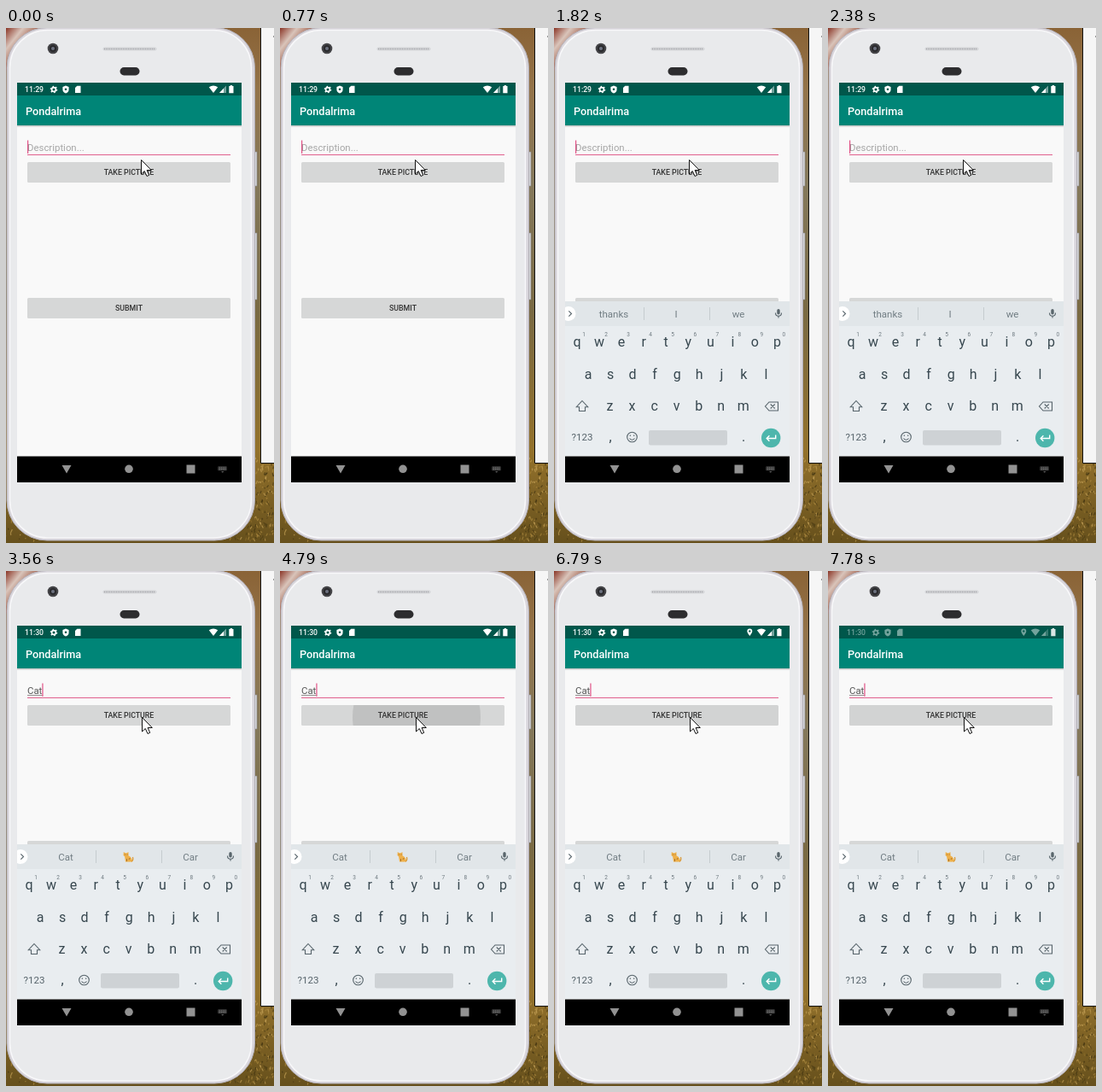
Recreate the animation shown at these times as an HTML page. Size 314x603 px, loop 8 s.

```html
<!DOCTYPE html>
<html lang="en">
<head>
<meta charset="utf-8">
<title>Phone form</title>
<style>
html, body { margin: 0; width: 100%; height: 100%; overflow: hidden; background: #7a6034; }
svg { display: block; width: 100vw; height: 100vh; font-family: Roboto, "Liberation Sans", sans-serif; }
.mid { text-anchor: middle; }
.medium { font-weight: 500; }
.line { fill: none; stroke: #56636a; stroke-width: 1.1; }
.key { font-size: 16px; fill: #37474f; }
.digit { font-size: 6.5px; fill: #6f7a80; }
.hint { font-size: 11.5px; fill: #717d83; }
.label { font-size: 8.8px; fill: #333; }
</style>
</head>
<body>
<svg viewBox="0 0 314 603" preserveAspectRatio="none">
  <defs>
    <linearGradient id="field" x2="0" y2="1">
      <stop offset="0" stop-color="#8a6336"/>
      <stop offset=".12" stop-color="#94744a"/>
      <stop offset=".3" stop-color="#85795c"/>
      <stop offset=".55" stop-color="#7a6a44"/>
      <stop offset=".82" stop-color="#94722c"/>
      <stop offset="1" stop-color="#66501c"/>
    </linearGradient>
    <linearGradient id="leaves" x2="1" y2="1">
      <stop offset="0" stop-color="#8a3526"/>
      <stop offset=".25" stop-color="#d9c4ba"/>
      <stop offset=".5" stop-color="#a2604c"/>
      <stop offset="1" stop-color="#7c4c38"/>
    </linearGradient>
    <linearGradient id="shade" x2="0" y2="1">
      <stop offset="0" stop-opacity=".25"/>
      <stop offset="1" stop-opacity="0"/>
    </linearGradient>
    <clipPath id="screen"><rect x="13" y="64" width="263" height="468"/></clipPath>
    <clipPath id="press"><rect x="25" y="157" width="238" height="24" rx="1.5"/></clipPath>
  </defs>

  <!-- backdrop and window behind the phone -->
  <rect width="314" height="603" fill="url(#field)"/>
  <rect width="40" height="50" fill="url(#leaves)"/>
  <g id="grass" stroke-width="1.2"/>
  <path d="M298.5 -1V509.5H315V-1z" fill="#f6f6f6" stroke="#111"/>
  <path d="M313 9h1v2h-1z" fill="#999"/>

  <!-- phone body -->
  <path d="M291 145h3v40h-3zM291 240h3v78h-3z" fill="#d4d5d8" stroke="#8c8c90" stroke-width=".6"/>
  <rect x="1" y="-.5" width="290.5" height="600.5" rx="47" fill="#d9d6dc" stroke="#b3b0b8"/>
  <rect x="4.5" y="2.5" width="283" height="594.5" rx="44" fill="#e9eaec" stroke="#f8f8fa" stroke-width="1.5"/>
  <circle cx="55" cy="24" r="6.3" fill="#444447"/>
  <circle cx="55" cy="24" r="4" fill="#29292c"/>
  <circle cx="55" cy="24" r="2" fill="#6d7280"/>
  <rect x="113.5" y="22.5" width="63" height="4" rx="2" fill="#d4d5d8"/>
  <path d="M115 24.5h60" stroke="#a2a3a7" stroke-width="1.5" stroke-dasharray="1 1"/>
  <rect x="133.5" y="46" width="23" height="9.5" rx="4.7" fill="#2d2d2f"/>

  <g clip-path="url(#screen)">
    <rect x="13" y="64" width="263" height="468" fill="#f9f9f9"/>
    <rect x="13" y="64" width="263" height="15" fill="#00574b"/>
    <rect x="13" y="79" width="263" height="35" fill="#008577"/>
    <rect x="13" y="114" width="263" height="2.5" fill="url(#shade)"/>
    <text x="23" y="102" class="medium" font-size="12.7" fill="#fff">Pondalrima</text>

    <g id="status" fill="#fff">
      <text id="clock" x="22" y="75" class="medium" font-size="8.7"></text>
      <circle cx="56" cy="72" r="2.4" fill="none" stroke="#fff" stroke-width="1.7"/>
      <circle cx="56" cy="72" r="3.7" fill="none" stroke="#fff" stroke-width="1.2" stroke-dasharray="1.6 2.27"/>
      <path d="M70 67.5l3.6 1.4v3q0 3-3.6 4.6q-3.6-1.6-3.6-4.6v-3z"/>
      <circle cx="70" cy="71.7" r="1.3" fill="#00574b"/>
      <path d="M83.3 67.7h4.2v8.3h-6.5v-6z"/>
      <path d="M237.8 69.3q5.2-3.6 10.4 0L243 76z"/>
      <path d="M250 76l8-8.5V76z" opacity=".45"/>
      <path d="M250 76l5-5.3V76z"/>
      <path id="place" fill-rule="evenodd" d="M229.3 76q-3-3.6-3-5.5a3 3 0 0 1 6 0q0 1.9-3 5.5zm0-6.7a1.2 1.2 0 1 0 .01 0z"/>
    </g>
    <path id="battery" d="M262.7 67h2.4v1h1.4v8.3h-5.2V68h1.4z" fill="#fff"/>

    <!-- form -->
    <text id="entry" x="25" y="143.5" font-size="11.4"></text>
    <path id="compose" stroke="#777" stroke-width=".8"/>
    <path d="M25 148.5h238" stroke="#e0608d"/>
    <rect id="caret" y="131.5" width="1.2" height="15.5" fill="#d81b60"/>
    <rect id="take" x="25" y="157" width="238" height="24" rx="1.5"/>
    <circle id="ripple" cx="160" cy="171" clip-path="url(#press)" opacity=".1"/>
    <text x="144" y="172.3" class="mid medium label">TAKE PICTURE</text>
    <rect x="25" y="316" width="238" height="24" rx="1.5" fill="#d6d7d7"/>
    <text x="144" y="331.2" class="mid medium label">SUBMIT</text>

    <!-- navigation bar -->
    <rect x="13" y="501.5" width="263" height="31"/>
    <g fill="#929292">
      <path d="M65.5 512h11l-5.5 9.5z"/>
      <circle cx="144" cy="516.3" r="4.8"/>
      <rect x="211.5" y="511.5" width="10" height="10"/>
      <path d="M248.5 513.5h10v4.5h-10zM252 519h3.5l-1.7 1.7z" opacity=".65"/>
      <path d="M249 514.8h9M249 516.8h9" stroke="#000" stroke-width=".7" stroke-dasharray="1 1"/>
    </g>

    <!-- keyboard -->
    <g id="board">
      <rect x="13" y="320" width="263" height="181" fill="#e9edf0"/>
      <rect x="13" y="320" width="263" height="29" fill="#e1e6e9"/>
      <circle cx="17" cy="334.5" r="8.5" fill="#fff"/>
      <path d="M17.3 331.3l3.2 3.2l-3.2 3.2" class="line"/>
      <path d="M105.5 327v15M182.5 327v15" stroke="#c5cccf"/>
      <g id="hints"></g>
      <g id="cat" fill="#eeb04a">
        <path d="M137.5 333l.3-4l2 1.3h1.6l2-1.3l.2 4q-3 3.500-6.100 0z"/>
        <path d="M139 333.500l4-.5q5 2 5 7.500h-8z"/>
        <path d="M147 340q2.500-1 1.500-5" fill="none" stroke="#d9952f" stroke-width="1.2"/>
        <path d="M139 332h1m1.500 0h1M141.500 337v3M145 336l-1 2" stroke="#8a5a22" stroke-width=".7"/>
      </g>
      <rect x="261.3" y="329" width="3.4" height="6.5" rx="1.7" fill="#5a666c"/>
      <path d="M259.5 333.5q0 3.800 3.500 3.800t3.500-3.800M263 337.5v2" class="line"/>
      <g id="keys"></g>
      <path id="shift" d="M33 436.500l6.700 7.200h-3.200v4.800h-7v-4.800h-3.200z" class="line"/>
      <path d="M252 438h10.500v10H252l-4.500-5zM253.700 440.500l5 5m0-5l-5 5" class="line"/>
      <text x="33" y="483" class="mid" font-size="11.5" fill="#56636a">?123</text>
      <text x="66" y="483.5" class="mid key">,</text>
      <circle cx="91.5" cy="479" r="5.8" class="line"/>
      <path d="M88.5 480.5q3 3.500 6 0M89.3 476.500v1.500M93.700 476.500v1.500" class="line"/>
      <rect x="111" y="471" width="92" height="17.5" rx="2" fill="#ced2d5"/>
      <text x="222" y="483.5" class="mid key">.</text>
      <circle cx="254.2" cy="480" r="11.2" fill="#4db6ac"/>
      <path d="M259.7 476.500v4h-10.500m3.200-3.200l-3.200 3.200l3.200 3.200" fill="none" stroke="#fff" stroke-width="1.4"/>
    </g>
  </g>

  <path id="mouse" d="M0 0V16.500L3.800 13L6.500 19L9.200 17.800L6.600 12H11.800z" fill="#fff" stroke="#111"/>
</svg>
<script>
const NS = "http://www.w3.org/2000/svg";
const $ = id => document.getElementById(id);
const set = (el, attrs) => { for (const k in attrs) el.setAttribute(k, attrs[k]); };

function add(parent, tag, attrs, text = "") {
  const el = document.createElementNS(NS, tag);
  set(el, attrs);
  el.textContent = text;
  return $(parent).appendChild(el);
}

// Seeded blades of grass
let seed = 7;
const rnd = () => (seed = seed * 16807 % 2147483647) / 2147483647;
const tones = ["#b08c40", "#4a3a14", "#8f6f2c", "#c8a45a", "#3c3010"];
for (let i = 0; i < 400; i++) {
  const x = i % 4 ? 262 + rnd() * 52 : rnd() * 40;
  const y = 505 + rnd() * 98;
  add("grass", "path", {
    d: `M${x} ${y}l${rnd() * 4 - 2} ${-1 - rnd() * 3}`,
    stroke: tones[i % 5], opacity: 0.65
  });
}

// Letter keys: letters, first centre, baseline
const letters = [];
for (const [row, x0, y] of [["qwertyuiop", 27, 373], ["asdfghjkl", 40, 410.5], ["zxcvbnm", 65.5, 448]]) {
  [...row].forEach((c, i) => {
    const x = x0 + i * 26.05;
    letters.push(add("keys", "text", { x, y, class: "mid key" }, c));
    if (row.length === 10) add("keys", "text", { x: x + 8, y: 361, class: "mid digit" }, (i + 1) % 10);
  });
}
const hints = [70, 143, 216].map(x => add("hints", "text", { x, y: 338.7, class: "mid hint" }));

// Value of the last [time, value] pair reached
const at = (t, steps) => steps.reduce((v, s) => t >= s[0] ? s[1] : v, steps[0][1]);

const typed = [[0, ""], [2520, "C"], [2640, "Ca"], [2760, "Cat"]];
const words = { "": ["thanks", "I", "we"], C: ["C", "Can", "Call"], Ca: ["Ca", "Can", "Car"], Cat: ["Cat", "", "Car"] };
const blinks = [340, 770, 1290, 1820, 3160, 3560, 4120, 4650];

function draw(t) {
  const text = at(t, typed);
  $("entry").textContent = text || "Description...";
  set($("entry"), { fill: text ? "#555" : "#a6a6a6" });
  const end = text ? 25 + $("entry").getComputedTextLength() : 25;
  set($("compose"), { d: text ? `M25 145.5H${end}` : "" });
  const off = blinks.filter(b => t >= b).length % 2;
  set($("caret"), { x: end, opacity: off ? 0 : 0.75 });

  const [dy, alpha] = at(t, [[0, [0, 0]], [890, [2, 0.94]], [1010, [0, 1]]]);
  set($("board"), { transform: `translate(0 ${dy})`, opacity: alpha });
  hints.forEach((el, i) => el.textContent = words[text][i]);
  set($("cat"), { opacity: text === "Cat" ? 1 : 0 });
  const caps = t >= 2220 && t < 2380;
  for (const el of letters) el.textContent = caps ? el.textContent.toUpperCase() : el.textContent.toLowerCase();
  $("shift").style.fill = caps ? "#56636a" : "none";

  set($("take"), { fill: at(t, [[0, "#d6d7d7"], [4910, "#cbcccc"], [5440, "#d2d3d3"]]) });
  set($("ripple"), { r: at(t, [[0, 0], [4790, 75], [4910, 0]]) });

  $("clock").textContent = t < 3160 ? "11:29" : "11:30";
  set($("place"), { opacity: t < 6790 ? 0 : 1 });
  set($("status"), { opacity: at(t, [[0, 1], [7540, 0.82], [7660, 0.62], [7780, 0.45]]) });
  set($("battery"), { opacity: at(t, [[0, 1], [7540, 0.95], [7660, 0.9], [7780, 0.85]]) });

  const [x, y] = at(t, [[0, [158.5, 154.5]], [3160, [159, 163]], [3280, [159.5, 171.5]]]);
  set($("mouse"), { transform: `translate(${x} ${y})` });
}

let start;
function frame(now) {
  start ??= now;
  draw((now - start) % 8000);
  requestAnimationFrame(frame);
}
draw(0);
requestAnimationFrame(frame);
</script>
</body>
</html>
```
